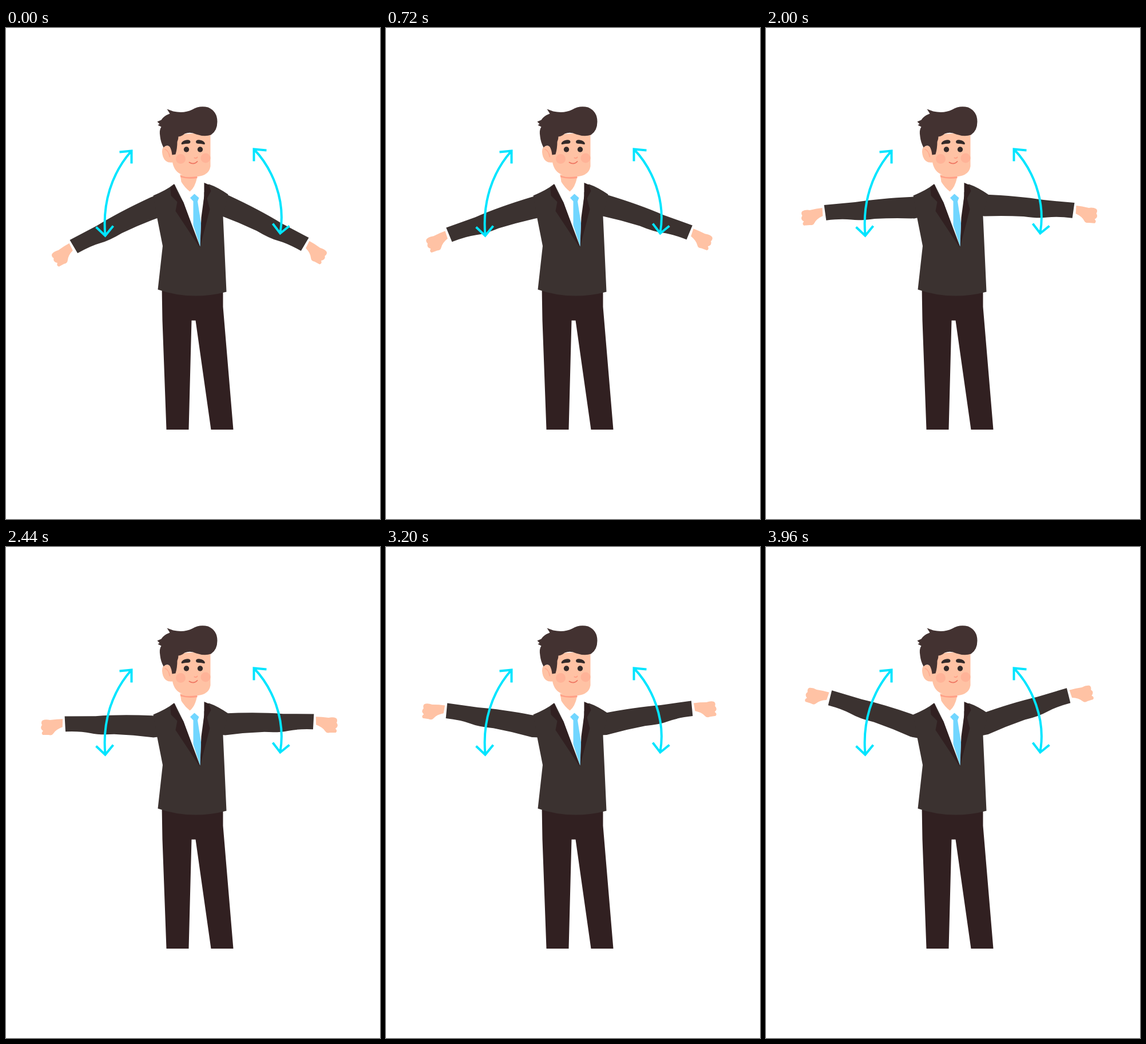
An HTML page that plays this animation: 654x857 px, repeating every 4 s.

```html
<!DOCTYPE html>
<html lang="en">
<head>
<meta charset="utf-8">
<title>Arm swing</title>
<style>
  html, body { margin: 0; width: 100%; height: 100%; overflow: hidden; background: #fff; }
  svg { display: block; width: 100%; height: 100%; }
  .suit { fill: #3b3230; }
  .dark { fill: #312021; }
  .skin { fill: #ffc2a4; }
</style>
</head>
<body>
<svg viewBox="-0.5 -0.5 654 857">
  <defs>
    <!-- Level arm, shoulder joint at the origin -->
    <g id="arm">
      <path class="skin" d="M-161 1L-160 15Q-171 20 -175 28Q-177 32 -183 31L-193 32Q-197 29 -193 25Q-200 21 -196 15Q-199 10 -196 7Q-191 4 -183 5Q-171 2 -161 1Z"/>
      <path class="suit" d="M14 -20H0Q-60 -17 -104 -9.500L-158 -4L-154 22.500Q-128 19 -110 21Q-95 23 -69 19Q-34 17 0 18L14 15Z"/>
    </g>
  </defs>

  <path class="dark" d="M272 450L273 510L280 700.500H319L324 510H331L358 700.500H397L379 486V450Z"/>
  <use id="left" href="#arm"/>
  <use id="right" href="#arm"/>
  <path class="suit" d="M293 272Q281 282 257 292L264 332L273.500 380L265 456Q323 476 385 460L379 328L388 290Q369 277 354 272L338 300Z"/>

  <path fill="#fff" d="M294 272L305 259H335L346 269V292L339 381L309 302Z"/>
  <g class="dark">
    <path d="M294 272L287 279L288 292L299 303L296 319L338.500 383L310 304Q299 290 294 272Z"/>
    <path d="M346 269.500L354 273L358 284L351 297L356 316L338.500 383L341 330L346 293Z"/>
  </g>
  <path fill="#71d6ff" d="M329 289L337 296L334.500 302L340.500 340L339 381L327 344V302L321.500 296Z"/>

  <g class="skin">
    <path d="M304 255L306 268Q312 278 321 285Q330 278 333.500 261V255Z"/>
    <path d="M292 209Q280 202 274 208Q271 214 274 224Q278 236 291 234Z"/>
  </g>
  <path fill="#ff9f86" d="M304 257Q318 262 334 258V261.500Q318 264 305 260Z"/>
  <path fill="none" stroke="#ffa88e" stroke-width="1.500" d="M277 211Q284 213 286 225"/>
  <path class="skin" d="M290 215L299 185L357 182V241Q355 256 336 258.500Q320 260 304 254Q292 248 290 230Z"/>
  <g fill="#ffb398">
    <circle cx="305" cy="228" r="8.500"/>
    <circle cx="348.500" cy="226.500" r="8.500"/>
  </g>
  <path fill="#433231" d="M290 221L296 220Q299 210 299 198Q301 194 301 189Q306 189 312 184Q322 180 332 185Q347 190 358 186Q369 179 369 163Q369 145 353 138Q338 134 325 142Q311 149 292 145L281 141L286 149Q275 153 271 160L264 163L268 167L265 169L271 172Q267 178 269 189Q270 199 275 208Q281 202 286 207Q289 212 290 221Z"/>
  <g fill="#342a29">
    <path id="brow" d="M306 201Q308 196 315 195Q321 194 322 198Q322 202 315 201.500Q309 202 307 203Z"/>
    <use href="#brow" transform="translate(653.500) scale(-1 1)"/>
    <circle cx="315" cy="211.500" r="4.700"/>
    <circle cx="339" cy="211.500" r="4.700"/>
  </g>
  <g fill="none" stroke-linecap="round" stroke-width="1.800">
    <path stroke="#ff9f86" d="M329 226Q332 228 334 225"/>
    <path stroke="#ee7460" d="M320 234Q328 239 334 232.500"/>
  </g>

  <g fill="none" stroke="#00e5ff" stroke-width="4">
    <path d="M218 215C184 254 168 305 173 361M198 216L219 214V236M157 347L173 362L187 345"/>
    <path d="M433 211C465 244 489 300 479 357M455 213L433 211V232M466 341L479 358L495 345"/>
  </g>
</svg>
<script>
const LOOP = 4000, STEP = 40, LOWEST = -22, SWING = 45;
const left = document.getElementById('left');
const right = document.getElementById('right');

function draw(ms) {
  const t = Math.floor(ms % LOOP / STEP) * STEP;
  const lift = LOWEST + SWING * t / LOOP;
  left.setAttribute('transform', `translate(259 314) rotate(${lift})`);
  right.setAttribute('transform', `translate(381 310) scale(-1 1) rotate(${lift})`);
}

const start = performance.now();
function tick() {
  draw(performance.now() - start);
  requestAnimationFrame(tick);
}
tick();
</script>
</body>
</html>
```
